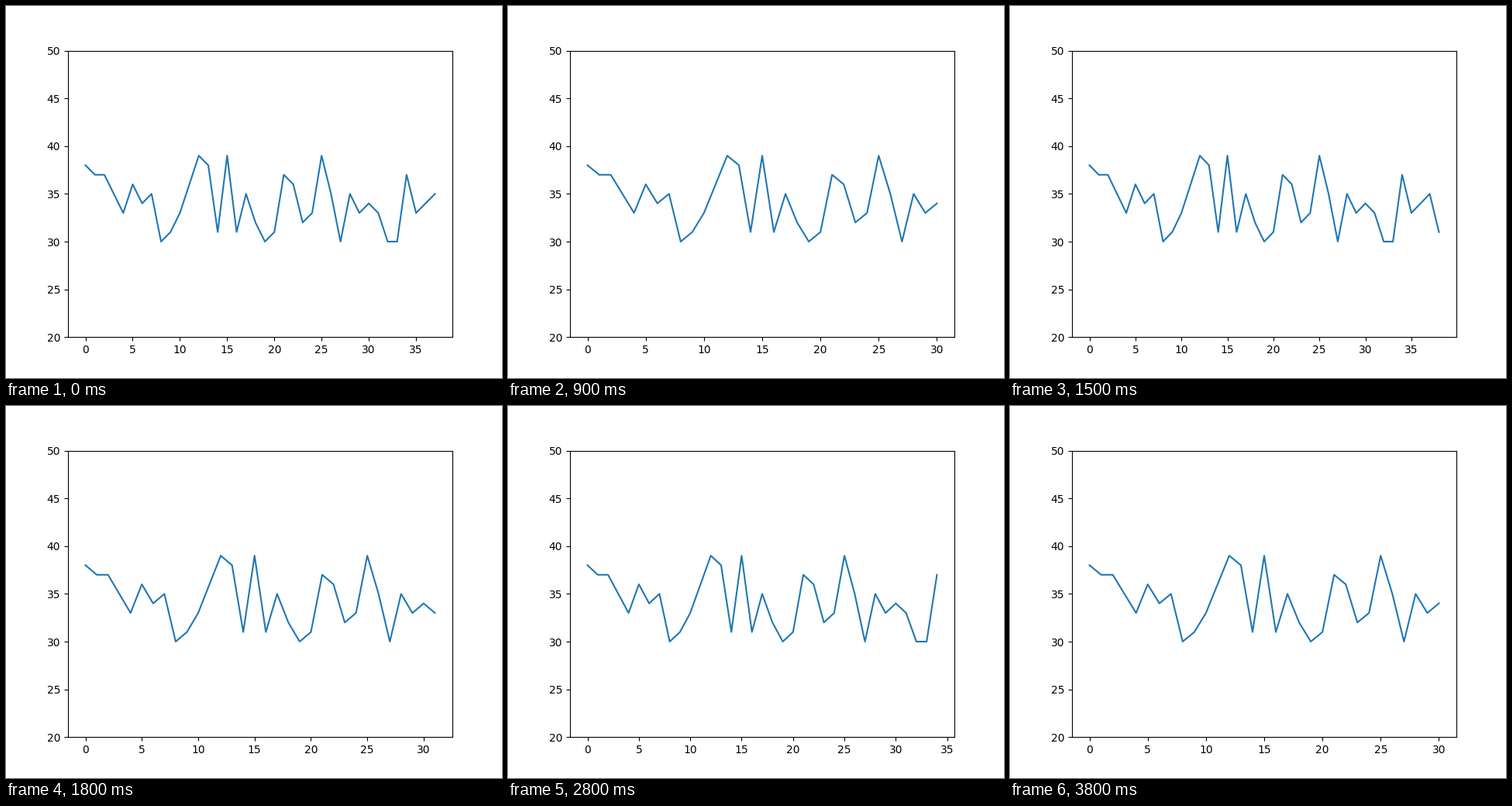
These frames come from a looping animation (640x480 px, 4 s). A matplotlib script:

```python
import matplotlib.pyplot as plt
from matplotlib.animation import FuncAnimation

VALUES = [
    38, 37, 37, 35, 33, 36, 34, 35, 30, 31,
    33, 36, 39, 38, 31, 39, 31, 35, 32, 30,
    31, 37, 36, 32, 33, 39, 35, 30, 35, 33,
    34, 33, 30, 30, 37, 33, 34, 35, 31, 31,
]
X_MARGIN = 0.05

fig, ax = plt.subplots(figsize=(6.4, 4.8), dpi=100)
ax.set_ylim(20, 50)
line, = ax.plot([], [], color="#1f77b4", lw=1.5)


def update(step):
    # The current value sets how many points are shown.
    count = VALUES[step]
    last = count - 1
    line.set_data(range(count), VALUES[:count])
    ax.set_xlim(-X_MARGIN * last, (1 + X_MARGIN) * last)
    return line,


anim = FuncAnimation(fig, update, frames=len(VALUES), interval=100,
                     init_func=lambda: update(0), repeat=True,
                     repeat_delay=0, blit=False)

plt.show()
```
